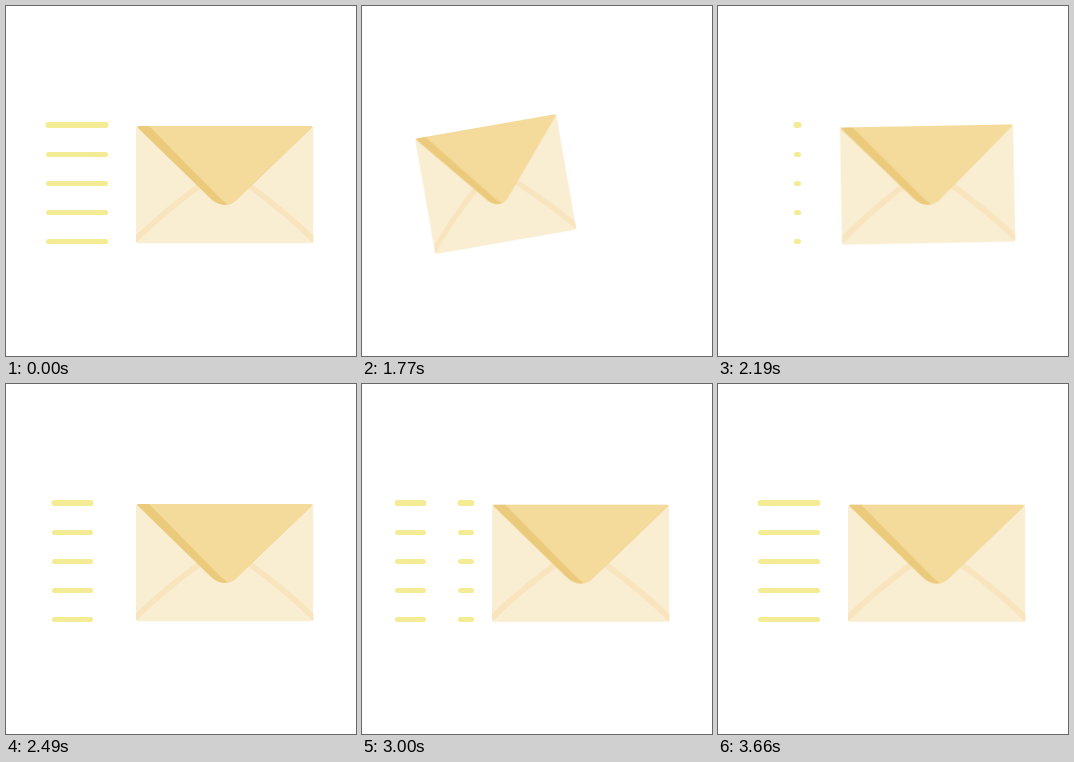
These frames come from a looping animation (350 px wide and 350 px high, 3.72 s). An HTML page:

```html
<!DOCTYPE html>
<html lang="en">
<head>
<meta charset="utf-8">
<title>Flying envelope</title>
<style>
  html, body { margin: 0; width: 100%; height: 100%; overflow: hidden; background: #fff; }
  svg { display: block; width: 100%; height: 100%; }

  .envelope {
    transform-origin: 218.5px 178.5px;
    animation: dash-back 3720ms linear infinite;
  }
  .lines {
    fill: none;
    stroke: #f3ec94;
    stroke-width: 5;
    stroke-linecap: round;
    animation: sweep 3720ms linear infinite, blink 3720ms linear infinite;
  }

  @keyframes dash-back {
    0%, 41.12% { transform: translate(0, 0) rotate(0deg) scaleX(1); }
    41.125% {
      transform: translate(-35px, -.5px) rotate(-4.1deg) scaleX(.923);
      animation-timing-function: cubic-bezier(.33, .67, .67, 1);
    }
    46.77% { transform: translate(-85px, -.5px) rotate(-9.9deg) scaleX(.809); }
    54.68% {
      transform: translate(-85px, -.5px) rotate(-9.9deg) scaleX(.809);
      animation-timing-function: cubic-bezier(.37, 0, .63, 1);
    }
    60.05%, 70.1% { transform: translate(0, 0) rotate(0deg) scaleX(1); }
    70.15%, 100% { transform: translate(0, .6px) rotate(0deg) scaleX(1); }
  }

  /* The dash pattern repeats every 74px, the path length, so it wraps around. */
  @keyframes sweep {
    0%, 41.12% { stroke-dasharray: 57px 17px; stroke-dashoffset: -7px; }
    41.125% {
      stroke-dasharray: 31px 43px; stroke-dashoffset: -7px;
      animation-timing-function: cubic-bezier(.33, .5, .67, .9);
    }
    44.57% { stroke-dasharray: 0px 74px; stroke-dashoffset: -7px; }
    44.6%, 58.33% { stroke-dasharray: 0px 74px; stroke-dashoffset: -45px; }
    58.87% { stroke-dasharray: 2px 72px; stroke-dashoffset: -43px; }
    66.94% { stroke-dasharray: 36px 38px; stroke-dashoffset: -13px; }
    80.65% { stroke-dasharray: 37px 37px; stroke-dashoffset: 11px; }
    98.38%, 100% { stroke-dasharray: 57px 17px; stroke-dashoffset: 67px; }
  }
  @keyframes blink {
    0%, 44.56% { opacity: 1; }
    44.57%, 58.32% { opacity: 0; }
    58.33%, 100% { opacity: 1; }
  }
</style>
</head>
<body>
<svg viewBox="0 0 350 350">
  <defs>
    <clipPath id="body"><rect x="130" y="120" width="177.5" height="117.5" rx="3"/></clipPath>
    <clipPath id="flap">
      <path id="flap-shape" d="M130 120H307.5L233 191.500Q226 199 218.500 199Q211 199 204 192Z"/>
    </clipPath>
  </defs>

  <g class="lines">
    <path stroke-width="6" style="stroke-width:6" d="M35.500 119H109.500"/>
    <path d="M35.500 148.500H109.500"/>
    <path d="M35.500 177.500H109.500"/>
    <path d="M35.500 206.500H109.500"/>
    <path d="M35.500 235.500H109.500"/>
  </g>

  <g class="envelope" clip-path="url(#body)">
    <rect x="130" y="120" width="177.500" height="117.500" fill="#f9edd2"/>
    <g fill="none" stroke="#f8e4bd" stroke-width="5.500">
      <path d="M127 236Q155 208 196 178"/>
      <path d="M310 236Q282 208 241 178"/>
    </g>
    <use href="#flap-shape" fill="#ecca7c"/>
    <path clip-path="url(#flap)" fill="#f4db9b" d="M143 120H308V200H225Q219 197 214 192Z"/>
  </g>
</svg>
</body>
</html>
```
